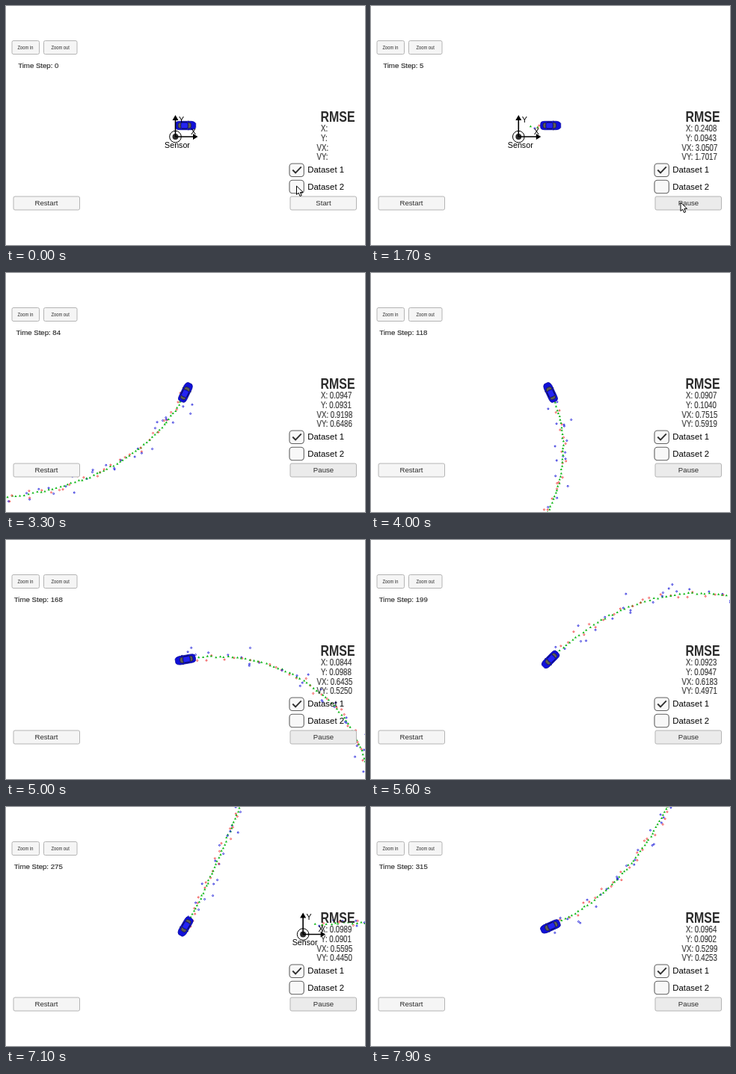
Recreate the animation shown at these times as an HTML page. Size 480 px wide and 320 px high, loop 8000 ms.

```html
<!DOCTYPE html>
<html lang="en">
<head>
<meta charset="utf-8">
<title>Vehicle tracking</title>
<style>
  html, body { margin: 0; width: 100%; height: 100%; overflow: hidden; background: #fff; }
  svg { display: block; width: 480px; height: 320px; font: 9px "Liberation Sans", Arial, sans-serif; fill: #2c2c2c; }
  .mid { text-anchor: middle; }
  .button { fill: #f5f5f5; stroke: #b4b4b4; }
  .box { fill: #f8f8f8; stroke: #606060; stroke-width: 1.1; }
  .small { font-size: 8px; }
  .label { font-size: 11.4px; fill: #000; }
  .value { font-size: 12.4px; fill: #3a3a3a; stroke: #3a3a3a; stroke-width: .2; }
  .ring { fill: none; stroke-width: .9; }
  .lidar { stroke: #f03838; }
  .radar { stroke: #1414d8; }
  .estimate { fill: #10b818; }
</style>
</head>
<body>
<svg viewBox="0 0 480 320">
  <g id="world"></g>
  <g id="car">
    <path d="M-13 -3.8Q-12 -5.7 -8 -5.7L8 -5.7Q12.5 -5.3 13.7 -2.7L13.7 2.7Q12.5 5.3 8 5.7L-8 5.7Q-12 5.7 -13 3.8Q-14.2 0 -13 -3.8Z" fill="#1010d8" stroke="#080898" stroke-width=".7"/>
    <rect x="-5.5" y="-3.2" width="8" height="6.4" rx="1.5" fill="#2424f0"/>
    <path d="M3 -4L7 -3.2Q8.3 0 7 3.2L3 4Q4.4 0 3 -4ZM-6 -3.8L-9.5 -3Q-10.5 0 -9.5 3L-6 3.8Q-7 0 -6 -3.8Z" fill="#5c5d58" stroke="#181830" stroke-width=".6"/>
    <path d="M-5 -4.3H2M-5 4.3H2M3.8 -6.4L4.6 -5.2M3.8 6.4L4.6 5.2" fill="none" stroke="#101030" stroke-width=".8"/>
  </g>
  <g id="sensor">
    <circle r="7.8" fill="none" stroke="#000"/>
    <circle r="4"/>
    <path d="M0 0V-24M0 0H25" stroke="#000" stroke-width="1.6"/>
    <path d="M0 -29L4 -22H-4ZM30 0L23.5 -4V4Z" fill="#000"/>
    <g class="mid" style="font-size:10.7px;fill:#000">
      <text x="8" y="-19">Y</text><text x="24" y="-3">X</text><text x="2.5" y="14.5">Sensor</text>
    </g>
  </g>

  <g class="button">
    <rect x="8" y="46.5" width="36.5" height="18" rx="2"/>
    <rect x="50.5" y="46.5" width="44.5" height="18" rx="2"/>
    <rect x="10" y="255" width="88.5" height="18" rx="2"/>
    <rect id="runButton" x="380" y="255" width="88.5" height="18" rx="2"/>
  </g>
  <g class="mid">
    <text class="small" transform="translate(26 58.4) scale(.72 1)">Zoom in</text>
    <text class="small" transform="translate(72.7 58.4) scale(.72 1)">Zoom out</text>
    <text transform="translate(54 267.3) scale(1.07 1)">Restart</text>
    <text id="runLabel" transform="translate(424.5 267.3) scale(1.07 1)">Start</text>
    <text id="clock" transform="translate(43.3 83.2) scale(1.07 1)" stroke="#2c2c2c" stroke-width=".15"></text>
  </g>

  <text transform="translate(420.5 155.2) scale(.82 1)" style="font-size:19.5px;font-weight:bold">RMSE</text>
  <g id="values"></g>

  <rect class="box" x="379" y="211" width="19.3" height="17.5" rx="4"/>
  <rect class="box" x="379" y="233.3" width="19.3" height="17.5" rx="4"/>
  <path d="M383.3 219.5L387.1 223.4L394.8 215.3" fill="none" stroke="#303030" stroke-width="1.9"/>
  <text class="label" x="403.3" y="223.3">Dataset 1</text>
  <text class="label" x="403.3" y="245.5">Dataset 2</text>

  <path id="cursor" d="M0 0V11.5L2.7 9.2L4.6 13.6L6.7 12.7L4.9 8.5L8.6 8.3Z" fill="#fff" stroke="#000" stroke-width="1"/>
</svg>
<script>
const LOOP = 8000, TICK = 100, LAST_STEP = 320;
const $ = id => document.getElementById(id);

const stepTimes = [1600, 2500, 4000, 5000, 6300, 7900];
const stepCounts = [0, 45, 118, 168, 235, 315];
const errorSteps = [5, 45, 118, 168, 235, 315];
const errors = [
  { name: 'X', x: 421, y: 167.9, at: [.2408, .0993, .0907, .0844, .1014, .0964] },
  { name: 'Y', x: 421, y: 180.8, at: [.0943, .0805, .1040, .0988, .0900, .0902] },
  { name: 'VX', x: 415.5, y: 193.6, at: [3.0507, 1.1128, .7515, .6435, .5890, .5299] },
  { name: 'VY', x: 415.5, y: 206.1, at: [1.7017, .7137, .5919, .5250, .4647, .4253] }
];

// Piecewise linear; the end segments extend outwards.
function interpolate(xs, ys, x) {
  let i = 1;
  while (i < xs.length - 1 && x > xs[i]) i++;
  const k = (x - xs[i - 1]) / (xs[i] - xs[i - 1]);
  return ys[i - 1] + k * (ys[i] - ys[i - 1]);
}

let seed = 20;
function random() {
  seed = (seed * 1664525 + 1013904223) % 4294967296;
  return seed / 4294967296;
}
const noise = () => 2 * (random() + random() + random() - 1.5);

// The yaw rate follows a sine, so the car drives a figure eight.
const heading = s => 2.16 * (1 - Math.cos(Math.PI * s / 247));
const speed = s => 5.25 + .6 * Math.cos(2 * Math.PI * s / 175);

const path = [{ x: 0, y: 0 }];
for (let s = 0; s < LAST_STEP; s++) {
  const a = heading(s + .5), v = speed(s + .5), p = path[s];
  path.push({ x: p.x + v * Math.cos(a), y: p.y - v * Math.sin(a) });
}

const ring = (kind, x, y) =>
  `<circle class="ring ${kind}" r="1" cx="${x.toFixed(1)}" cy="${y.toFixed(1)}"/>`;

function marksAt(s) {
  const { x, y } = path[s];
  const drift = 1 + 4 / s;
  const ex = x + noise() * .5 * drift, ey = y + noise() * .5 * drift;
  let mark;
  if (s % 2) {
    mark = ring('lidar', x + noise() * 2.8, y + noise() * 2.8);
  } else {
    const dx = x + 13.5, dy = y - 15, dist = Math.hypot(dx, dy);
    const along = noise() * 6 / dist, across = noise() * .028;
    mark = ring('radar', x + dx * along - dy * across, y + dy * along + dx * across);
  }
  return `<g>${mark}<path class="estimate" transform="translate(${ex.toFixed(1)} ${ey.toFixed(1)})" d="M0 -1.6L1.6 1.2H-1.6Z"/></g>`;
}

$('world').innerHTML = path.slice(1).map((_, i) => marksAt(i + 1)).join('');
const marks = [...$('world').children];
$('values').innerHTML = errors.map(e =>
  `<text class="value" transform="translate(${e.x} ${e.y}) scale(.78 1)"></text>`).join('');
const valueTexts = [...$('values').children];

function draw(t) {
  const step = t < 1600 ? 0 : Math.round(interpolate(stepTimes, stepCounts, t));
  const { x, y } = path[step];
  const running = t >= 1500;

  $('world').setAttribute('transform', `translate(${240 - x} ${160 - y})`);
  $('sensor').setAttribute('transform', `translate(${226.5 - x} ${175 - y})`);
  $('car').setAttribute('transform', `translate(240 160) rotate(${-heading(step) * 180 / Math.PI})`);
  marks.forEach((m, i) => m.style.display = i < step ? '' : 'none');

  $('clock').textContent = 'Time Step: ' + step;
  $('runLabel').textContent = running ? 'Pause' : 'Start';
  $('runButton').style.fill = running ? '#ebebeb' : '';
  errors.forEach((e, i) => {
    const value = step ? ' ' + interpolate(errorSteps, e.at, step).toFixed(4) : '';
    valueTexts[i].textContent = e.name + ':' + value;
  });

  const k = Math.min(1, Math.max(0, (t - 800) / 500));
  $('cursor').setAttribute('transform', `translate(${388.5 + 25.5 * k} ${241 + 22 * k})`);
  $('cursor').style.display = t < 2100 ? '' : 'none';
}

const start = performance.now();
let shown = -1;
function frame() {
  const t = Math.floor((performance.now() - start) % LOOP / TICK) * TICK;
  if (t !== shown) draw(shown = t);
  requestAnimationFrame(frame);
}
frame();
</script>
</body>
</html>
```
